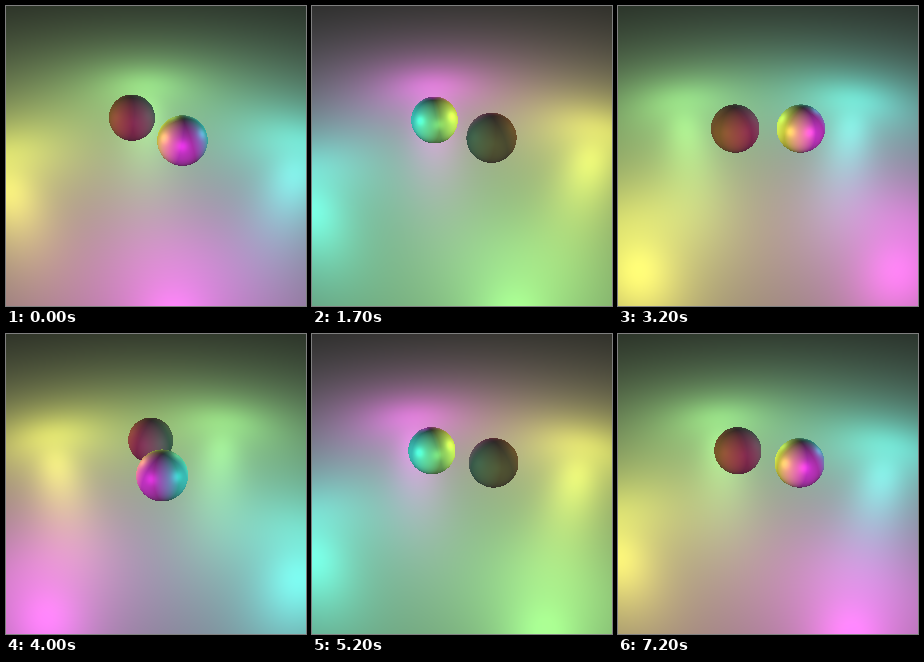
Recreate the animation shown at these times as an HTML page with a canvas. Size 300x300 px, loop 7300 ms.

```html
<!DOCTYPE html>
<html>
<head>
<meta charset="utf-8">
<style>
  html, body { margin: 0; width: 100%; height: 100%; overflow: hidden; background: #333; }
  canvas { display: block; width: 300px; height: 300px; }
</style>
</head>
<body>
<canvas id="stage" width="300" height="300"></canvas>
<script>
const SIZE = 300, STEP = 100, STEPS = 73;
const FOCAL = 362, PITCH = 37 * Math.PI / 180;
const CAM_Y = 9.45, CAM_Z = 12.7;
const ORBIT = 1.36, BALL_Y = 1.3;
const LIGHT_ORBIT = 6.7, LIGHT_Y = 2.6, SHININESS = 30;

const lights = [
  { offset: 45, color: [1, .1, 1] },
  { offset: -45, color: [.15, 1, .95] },
  { offset: -135, color: [.45, .86, .35] },
  { offset: 135, color: [1, .98, .15] }
];
const floor = { ambient: [.035, .035, .035], diffuse: [.6, .6, .6], shine: .22 };
const balls = [
  { offset: 0, ambient: [.13, .13, .13], diffuse: [.6, .6, .6], shine: .2 },
  { offset: 180, ambient: [.16, .13, .14], diffuse: [.32, .21, .15], shine: .02 }
];

const ctx = document.getElementById('stage').getContext('2d');
const image = ctx.createImageData(SIZE, SIZE);
const sin = Math.sin(PITCH), cos = Math.cos(PITCH);

function place(item, angle, radius) {
  const a = (angle + item.offset) * Math.PI / 180;
  item.x = radius * Math.cos(a);
  item.z = radius * Math.sin(a);
}

// Distance along the unit ray to a ball of radius 1, or Infinity
function hit(ball, dx, dy, dz) {
  const ox = -ball.x, oy = CAM_Y - BALL_Y, oz = CAM_Z - ball.z;
  const b = ox * dx + oy * dy + oz * dz;
  const disc = b * b - (ox * ox + oy * oy + oz * oz - 1);
  return disc < 0 ? Infinity : -b - Math.sqrt(disc);
}

// Blinn-Phong shading where the unit ray meets a ball, or the floor if there is none
function shade(ball, dist, dx, dy, dz, out) {
  const x = dx * dist, y = CAM_Y + dy * dist, z = CAM_Z + dz * dist;
  const nx = ball ? x - ball.x : 0, ny = ball ? y - BALL_Y : 1, nz = ball ? z - ball.z : 0;
  const { ambient, diffuse, shine } = ball || floor;
  for (let c = 0; c < 3; c++) out[c] = ambient[c];
  for (const l of lights) {
    let lx = l.x - x, ly = LIGHT_Y - y, lz = l.z - z;
    const len = Math.sqrt(lx * lx + ly * ly + lz * lz);
    lx /= len; ly /= len; lz /= len;
    const lambert = nx * lx + ny * ly + nz * lz;
    if (lambert <= 0) continue;
    const hx = lx - dx, hy = ly - dy, hz = lz - dz;
    const half = (nx * hx + ny * hy + nz * hz) / Math.sqrt(hx * hx + hy * hy + hz * hz);
    const spec = shine * Math.max(0, half) ** SHININESS;
    for (let c = 0; c < 3; c++) out[c] += l.color[c] * (diffuse[c] * lambert + spec);
  }
}

function render(angle) {
  lights.forEach(l => place(l, angle, LIGHT_ORBIT));
  balls.forEach(b => place(b, angle, ORBIT));
  const rgb = [0, 0, 0];
  let p = 0;
  for (let py = 0; py < SIZE; py++) {
    const v = (SIZE / 2 - py - .5) / FOCAL;
    for (let px = 0; px < SIZE; px++) {
      const u = (px + .5 - SIZE / 2) / FOCAL;
      const len = Math.sqrt(1 + u * u + v * v);
      const dx = u / len, dy = (v * cos - sin) / len, dz = -(cos + v * sin) / len;
      let near = -CAM_Y / dy, ball = null;
      for (const b of balls) {
        const d = hit(b, dx, dy, dz);
        if (d < near) { near = d; ball = b; }
      }
      shade(ball, near, dx, dy, dz, rgb);
      for (let c = 0; c < 3; c++) image.data[p++] = rgb[c] * 255;
      image.data[p++] = 255;
    }
  }
  ctx.putImageData(image, 0, 0);
}

let shown = -1;
function tick() {
  const step = Math.floor(performance.now() / STEP) % STEPS;
  if (step !== shown) {
    shown = step;
    // The closing step falls back before the loop restarts
    render(step === STEPS - 1 ? 20 : 40 + 10 * step);
  }
  requestAnimationFrame(tick);
}
tick();
</script>
</body>
</html>
```
